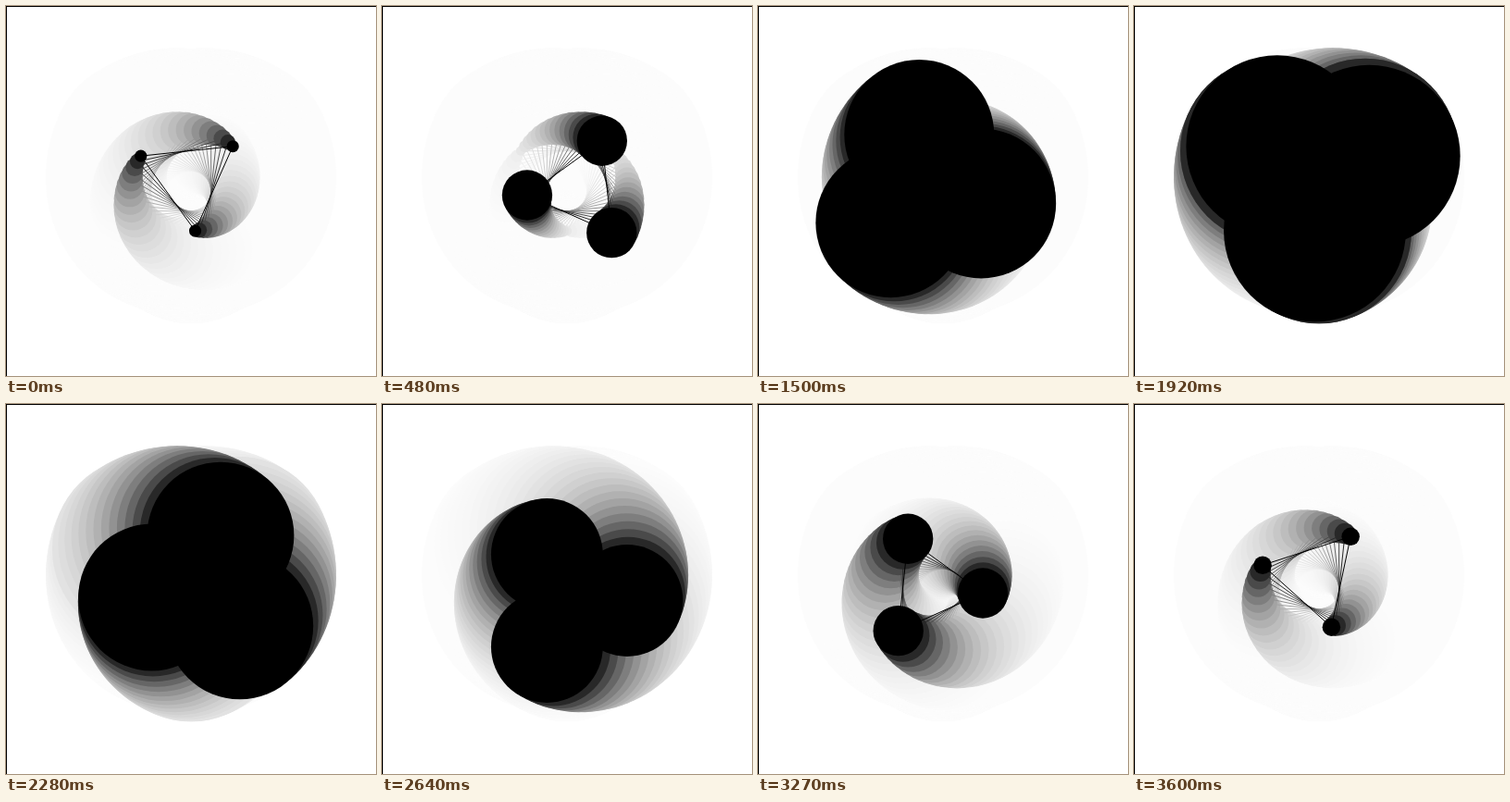
An HTML page with a canvas for the animation above (3630 ms loop, 400 by 400 pixels).

```html
<!DOCTYPE html>
<html>
<head>
<meta charset="utf-8">
<style>
  html, body { margin: 0; width: 100%; height: 100%; overflow: hidden; background: #fff; }
  canvas { display: block; }
</style>
</head>
<body>
<canvas id="stage" width="400" height="400"></canvas>
<script>
const ctx = document.getElementById('stage').getContext('2d');
const FRAME_MS = 30, FRAMES = 121;
const TURN = 61;            // poses in one turn, both ends included
const POSES = 2 * TURN;     // one turn growing, one turn shrinking
const HALF = 50, RISE = 25 * Math.sqrt(3);
const CORNERS = [[-HALF, -RISE], [HALF, -RISE], [0, RISE]];

// Grey level by age: each step keeps 215/255 of the darkness, down to a faint residue.
const greys = [];
for (let dark = 255, age = 0; age < POSES; age++) {
  greys.push(255 - dark);
  dark = Math.round(dark * 215 / 255);
}

function drawPose(pose, grey) {
  const step = pose % TURN;
  const growth = step / (TURN - 1);
  const radius = 5 + 95 * (pose < TURN ? growth : 1 - growth);
  const angle = growth * 2 * Math.PI;
  const cos = Math.cos(angle), sin = Math.sin(angle);
  const points = CORNERS.map(([x, y]) => [200 + x * cos - y * sin, 200 + x * sin + y * cos]);

  ctx.fillStyle = ctx.strokeStyle = `rgb(${grey},${grey},${grey})`;
  ctx.beginPath();
  for (const [x, y] of points) ctx.lineTo(x, y);
  ctx.closePath();
  ctx.stroke();
  for (const [x, y] of points) {
    ctx.beginPath();
    ctx.arc(x, y, radius, 0, 2 * Math.PI);
    ctx.fill();
  }
}

function render(frame) {
  ctx.fillStyle = '#fff';
  ctx.fillRect(0, 0, 400, 400);
  const current = frame + POSES - 2;
  for (let age = POSES - 1; age >= 0; age--) {
    drawPose((current - age + POSES) % POSES, greys[age]);
  }
  ctx.fillStyle = '#000';
  ctx.fillRect(0, 0, 400, 1);
  ctx.fillRect(0, 0, 1, 400);
}

let start, shown = -1;
function tick() {
  const now = performance.now();
  start ??= now;
  const frame = Math.floor((now - start) / FRAME_MS) % FRAMES;
  if (frame !== shown) render(shown = frame);
  requestAnimationFrame(tick);
}
tick();
</script>
</body>
</html>
```
